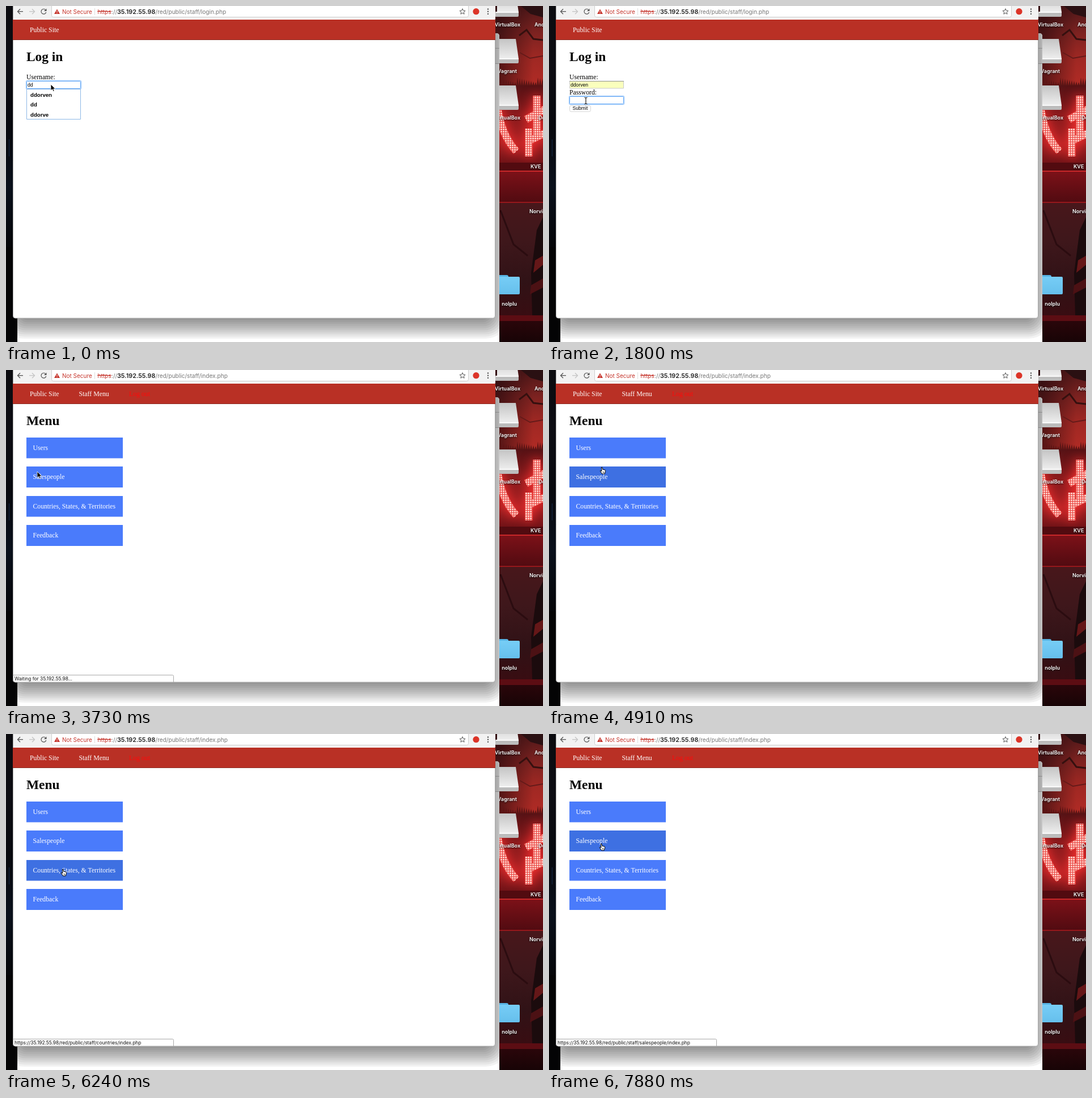
These frames come from a looping animation (947x592 px, 8000 ms). An HTML page with a canvas:

```html
<!DOCTYPE html>
<html lang="en">
<head>
<meta charset="utf-8">
<title>Log in</title>
<style>
html, body { margin: 0; width: 100%; height: 100%; overflow: hidden; background: #000; }
canvas { display: block; }
</style>
</head>
<body>
<canvas id="stage" width="947" height="592"></canvas>
<script>
const W = 947, H = 592, LOOP = 8000;
const SERIF = '"Liberation Serif", serif';
const SANS = '"Liberation Sans", sans-serif';
const UI = 'Inter, sans-serif';
const HOST = '35.192.55.98';
const USER = 'ddorven';
const MENU = ['Users', 'Salespeople', 'Countries, States, & Territories', 'Feedback'];

const stage = document.getElementById('stage').getContext('2d');
let c = stage;

function rect(x, y, w, h, fill) {
  c.fillStyle = fill;
  c.fillRect(x, y, w, h);
}
function box(x, y, w, h, r, fill, stroke, lw = 1) {
  c.beginPath();
  c.roundRect(x, y, w, h, r);
  if (fill) { c.fillStyle = fill; c.fill(); }
  if (stroke) { c.strokeStyle = stroke; c.lineWidth = lw; c.stroke(); }
}
function poly(points, fill, stroke, lw = 1, close = true) {
  c.beginPath();
  for (let i = 0; i < points.length; i += 2) c.lineTo(points[i], points[i + 1]);
  if (close) c.closePath();
  if (fill) { c.fillStyle = fill; c.fill(); }
  if (stroke) { c.strokeStyle = stroke; c.lineWidth = lw; c.stroke(); }
}
function disc(x, y, r, fill) {
  c.fillStyle = fill;
  c.beginPath();
  c.arc(x, y, r, 0, 7);
  c.fill();
}
function text(s, x, y, font, fill = '#000', align = 'left') {
  c.font = font;
  c.fillStyle = fill;
  c.textAlign = align;
  c.fillText(s, x, y);
}
function ramp(y0, y1, ...colors) {
  const g = c.createLinearGradient(0, y0, 0, y1);
  colors.forEach((col, i) => g.addColorStop(i / (colors.length - 1), col));
  return g;
}
function fade(x0, x1, from, to) {
  const g = c.createLinearGradient(x0, 0, x1, 0);
  g.addColorStop(0, from);
  g.addColorStop(1, to);
  return g;
}

// Desktop
function neon() {
  c.save();
  c.beginPath();
  c.rect(860, 140, 87, 150);
  c.clip();
  c.beginPath();
  c.moveTo(866, 172);
  c.quadraticCurveTo(872, 226, 900, 256);
  c.moveTo(917, 200);
  c.lineTo(950, 182);
  c.moveTo(936, 158);
  c.lineTo(936, 232);
  c.moveTo(922, 216);
  c.lineTo(922, 265);
  c.moveTo(918, 240);
  c.lineTo(950, 224);
  c.shadowColor = '#ff3030';
  c.shadowBlur = 20;
  c.strokeStyle = '#e8433f';
  c.lineWidth = 14;
  c.stroke();
  c.shadowBlur = 0;
  const tile = document.createElement('canvas');
  tile.width = tile.height = 4;
  const t = tile.getContext('2d');
  t.fillStyle = '#ffc9c2';
  t.fillRect(0, 0, 3, 3);
  c.strokeStyle = c.createPattern(tile, 'repeat');
  c.lineWidth = 12;
  c.stroke();
  c.restore();
}
function drive(y) {
  poly([866, y, 899, y, 904, y + 35, 866, y + 35], ramp(y, y + 35, '#c4c4c4', '#eeeeee'));
  box(862, y + 34, 42, 9, 2, '#bcbcbc');
  rect(864, y + 34, 40, 2, '#fafafa');
}
function label(s, x, y, align) {
  c.shadowColor = '#000';
  c.shadowBlur = 3;
  c.shadowOffsetY = 1;
  text(s, x, y, '600 9px ' + UI, '#fff', align);
  c.shadowColor = 'transparent';
  c.shadowBlur = c.shadowOffsetY = 0;
}
function desktop() {
  rect(0, 0, W, H, '#040405');
  rect(0, 0, 20, 425, ramp(0, 425, '#0b0b0f', '#0d0d13', '#08090e', '#0a101b', '#050609'));
  rect(5, 235, 1, 30, '#162a48');

  rect(860, 0, 87, 140, ramp(0, 140, '#4e1718', '#7c2220', '#a02823', '#b02b25'));
  rect(860, 0, 87, 140, fade(870, 930, 'rgba(30,8,12,.6)', 'rgba(30,8,12,0)'));
  poly([908, 0, 947, 0, 947, 20, 925, 14], '#2a1012');
  poly([905, 52, 918, 42, 930, 58, 947, 60], null, '#35100f', 3, false);
  poly([906, 82, 924, 92, 947, 88], null, '#641a19', 2, false);
  for (let x = 872; x < W; x += 4) poly([x, 140, x + 2, 126 + x * 7 % 9, x + 4, 140], '#5a1515');
  rect(860, 140, 87, 152, ramp(140, 292, '#561215', '#8a1a1c', '#a01f21', '#5c0e13'));
  neon();
  rect(860, 276, 87, 15, '#520b10');
  rect(860, 290, 87, 2, '#c9282a');
  rect(860, 292, 87, 53, ramp(292, 345, '#7c1118', '#520b11'));
  rect(860, 345, 87, 2, '#96171c');
  rect(860, 347, 87, 208, ramp(347, 555, '#48171b', '#3e171b', '#301216', '#3a0c11'));
  poly([947, 372, 936, 395, 926, 470, 928, 545, 947, 545], '#1b0b0d');
  poly([933, 448, 947, 440, 947, 456, 930, 470], '#651718');
  poly([926, 492, 947, 480, 947, 496, 924, 508], '#4c1114');
  poly([872, 360, 895, 420, 920, 440], null, '#2b0c10', 3, false);
  rect(860, 545, 87, 10, '#5c0d13');
  rect(860, 555, 87, 37, ramp(555, 592, '#2a060a', '#180406'));

  drive(-24);
  drive(58);
  drive(140);
  box(864, 474, 22, 10, 3, '#58b4e4');
  box(860, 477, 46, 31, 2, ramp(477, 508, '#76cdf6', '#66bfec'));
  label('VirtualBox', 907, 36, 'right');
  label('Vagrant', 901, 118, 'right');
  label('VirtualBox', 907, 200, 'right');
  label('nolplu', 901, 528, 'right');
  label('Ano', 932, 36);
  label('Do', 939, 200);
  label('KVE', 925, 286);
  label('Norvi', 923, 365);
}

// Windows without their changing content
function windows() {
  c.save();
  c.beginPath();
  c.roundRect(20, 48, 850, 560, 5);
  c.clip();
  rect(20, 48, 850, 544, '#fff');
  rect(20, 48, 850, 54, '#ececec');
  rect(20, 74, 850, 1, '#bbb');
  rect(20, 101, 850, 1, '#bbb');
  for (let i = 0; i < 10; i++) {
    const d = i * 3.6;
    box(d - 8, d - 40, 894 - 2 * d, 626 - 2 * d, 40 - d * .8, 'rgba(0,0,0,.05)');
  }
  c.restore();

  box(12.5, -10, 850, 560, 4, '#fff', '#acacac');
  rect(13, 0, 850, 23, '#f2f2f2');
  box(80.5, -8, 735, 27.5, 3, '#fff', '#cfcfcf');
  rect(12, 24, 851, 36, '#b93025');
  rect(12, 59, 851, 1, '#8e2c24');

  arrow(25, 1, '#555');
  arrow(46, -1, '#c4c4c4');
  poly([90, 5.5, 95, 14, 85, 14], '#c5332a');
  rect(89.5, 8.3, 1, 3, '#fff');
  rect(89.5, 12, 1, 1, '#fff');
  text('Not Secure', 99, 13.5, '10px ' + UI, '#c5332a');
  rect(156, 4, 1, 12, '#ddd');
  const star = [];
  for (let i = 0; i < 10; i++) {
    const a = i * Math.PI / 5 - Math.PI / 2, r = i % 2 ? 2.4 : 5.3;
    star.push(805 + r * Math.cos(a), 10 + r * Math.sin(a));
  }
  poly(star, null, '#555');
  disc(829, 9.7, 5.6, '#dc3428');
  for (const y of [5.5, 9.7, 13.9]) disc(850, y, 1.2, '#555');
  text('Public Site', 42, 46, '11.8px ' + SERIF, '#fff');
}
function arrow(x, dir, col) {
  poly([x + 5 * dir, 9.7, x - 4 * dir, 9.7], null, col, 1.3, false);
  poly([x, 5.2, x - 4.5 * dir, 9.7, x, 14.2], null, col, 1.3, false);
}

// Browser parts
function address(page) {
  const font = '10.1px ' + UI;
  text('https', 161.5, 13.5, font, '#c5332a');
  rect(161, 9, 25, 1, '#c5332a');
  text('://', 186, 13.5, font, '#777');
  text(HOST, 196, 13.5, '600 10.8px ' + UI, '#222');
  text('/red/public/staff/' + page, 263.5, 13.5, font, '#777');
}
function reload(busy) {
  if (busy) {
    poly([62.5, 5.5, 71, 14], null, '#555', 1.3, false);
    poly([71, 5.5, 62.5, 14], null, '#555', 1.3, false);
    return;
  }
  c.strokeStyle = '#555';
  c.lineWidth = 1.3;
  c.beginPath();
  c.arc(66.5, 9.7, 4.4, .3, 5.5);
  c.stroke();
  poly([71.5, 4.5, 71.5, 9, 67, 9], '#555');
}
function status(s) {
  box(12.5, 537.5, 283, 12.5, [0, 2, 0, 4], '#fff', '#a9a9a9');
  text(s, 15, 546.8, '8.35px ' + UI, '#111');
}

// Pages
function field(y, focus, fill = '#fff') {
  if (focus) {
    box(35.5, y - .5, 97, 15, 2, null, 'rgba(110,175,250,.55)', 1.5);
    box(36.5, y + .5, 95, 13, 1, fill, '#5fa5f5');
  } else {
    box(36.5, y + .5, 95, 12.5, 0, fill, '#c9c9c9');
    rect(36, y, 96, 1, '#8f8f8f');
  }
}
function login(t) {
  const filled = t >= 150, open = t < 330, onPass = t >= 1210, sent = t >= 2700;
  const font = '11.7px ' + SERIF, small = '8.65px ' + SANS;
  text('Log in', 36, 97, 'bold 23.4px ' + SERIF);
  text('Username:', 36, 129, font);
  field(132, !onPass, filled ? '#faffbd' : '#fff');
  text(filled ? USER : USER.slice(0, 2), 38, 142, small);
  if (open) {
    box(36.5, 146.5, 95, 53, 0, '#fff', '#8db8e6');
    if (filled) rect(37, 147, 94, 17, '#d6e6fb');
    [7, 2, 6].forEach((n, i) => text(USER.slice(0, n), 43, 159.5 + i * 17.5, 'bold 9.65px ' + SANS));
    return;
  }
  text('Password:', 36, 156, font);
  field(159, onPass && !sent);
  if (t >= 1360 && t < 1800) rect(38, 161, 1, 10, '#000');
  if (t >= 2100) for (let i = 0; i < 11; i++) disc(41.3 + i * 4.5, 166, 1.7, '#000');
  const down = t >= 2840 && t < 2990;
  box(36.5, 175.5, 37, 10.5, 2.5, down ? '#4a90f0' : '#fff', '#d4d4d4');
  text('Submit', 41.5, 183.3, small, down ? '#fff' : '#000');
}
function menu(hover) {
  const font = '11.7px ' + SERIF;
  text('Staff Menu', 128.5, 46, '11.8px ' + SERIF, '#fff');
  text('Log out', 217, 46, '11.8px ' + SERIF, '#ff0a0a');
  text('Menu', 36, 97, 'bold 23.4px ' + SERIF);
  MENU.forEach((name, i) => {
    const y = 119 + i * 51.25;
    rect(36, Math.round(y), 170, i % 2 ? 37 : 36.5, i === hover ? '#3e70e2' : '#4a7bfb');
    text(name, 47.5, y + 22, font, '#fff');
  });
}

// Pointers
const pointers = {
  arrow(x, y) {
    poly([x, y, x, y + 11, x + 2.6, y + 8.6, x + 4.4, y + 12.4, x + 6.2, y + 11.6,
      x + 4.5, y + 8, x + 8, y + 8], '#000', '#fff', .8);
  },
  beam(x, y) {
    poly([x, y - 5, x, y + 5], null, '#000', 1.1, false);
    for (const d of [-1, 1]) poly([x - 2.5, y + 6 * d, x, y + 5 * d, x + 2.5, y + 6 * d], null, '#000', 1, false);
  },
  hand(x, y) {
    c.lineJoin = 'round';
    poly([x - 2.6, y - 5.5, x - 1, y - 5.5, x - .3, y - 1.8, x + 4, y - .8, x + 4.6, y + .5,
      x + 4, y + 3.5, x + 3.2, y + 6, x - 1.5, y + 6, x - 4.8, y + .8, x - 4, y, x - 2, y + 1.4], '#fff', '#000', 1);
    for (const d of [.2, 1.8]) poly([x + d, y + 2, x + d, y + 4.5], null, '#000', .7, false);
    c.lineJoin = 'miter';
  }
};
const path = [
  [0, 79, 138, 'arrow'], [150, 78, 150, 'arrow'], [620, 78, 150, 'arrow'], [920, 70, 160, 'beam'],
  [1360, 65, 167, 'beam'], [2250, 65, 167, 'beam'], [2550, 55, 179, 'arrow'], [4170, 55, 179, 'arrow'],
  [4320, 62, 176, 'hand'], [4620, 78, 146, 'hand'], [4910, 95, 176, 'hand'], [5350, 101, 198, 'hand'],
  [5640, 106, 231, 'hand'], [5940, 106, 246, 'hand'], [6530, 98, 243, 'hand'], [6680, 94, 250, 'hand'],
  [6980, 87, 291, 'hand'], [7130, 87, 294, 'hand'], [7580, 94, 206, 'hand'], [7880, 94, 199, 'hand']
];
function at(list, t) {
  let i = list.length - 1;
  while (i && list[i][0] > t) i--;
  return i;
}
function sample(t) {
  const step = 148.3;
  return Math.max(0, 1810 + Math.floor((t - 1790) / step) * step);
}
function pointer(t) {
  const q = sample(t), i = at(path, q), a = path[i], b = path[i + 1] || a;
  const k = b === a ? 0 : (q - a[0]) / (b[0] - a[0]);
  pointers[a[3]](Math.round(a[1] + (b[1] - a[1]) * k), Math.round(a[2] + (b[2] - a[2]) * k));
}

const hovers = [[0, -1], [4320, 1], [4470, -1], [4620, 0], [4770, -1], [4910, 1], [5490, -1],
  [5790, 2], [7130, 3], [7280, 2], [7430, -1], [7580, 1]];
const link = dir => `https://${HOST}/red/public/staff/${dir}/index.php`;
const notes = [[0, ''], [3440, `Waiting for ${HOST}...`], [4020, ''], [5050, link('salespeople')],
  [5940, link('countries')], [7130, link('feedback')], [7430, link('countries')], [7730, link('salespeople')]];

const back = document.createElement('canvas');
back.width = W;
back.height = H;
c = back.getContext('2d');
desktop();
windows();
c = stage;

const start = performance.now();
function draw(now) {
  const t = Math.max(0, now - start) % LOOP, inside = t >= 3590;
  c.drawImage(back, 0, 0);
  reload(t >= 2990 && !inside);
  address(inside ? 'index.php' : 'login.php');
  if (inside) menu(hovers[at(hovers, t)][1]);
  else login(t);
  const note = notes[at(notes, t)][1];
  if (note) status(note);
  pointer(t);
  requestAnimationFrame(draw);
}
draw(start);
</script>
</body>
</html>
```
